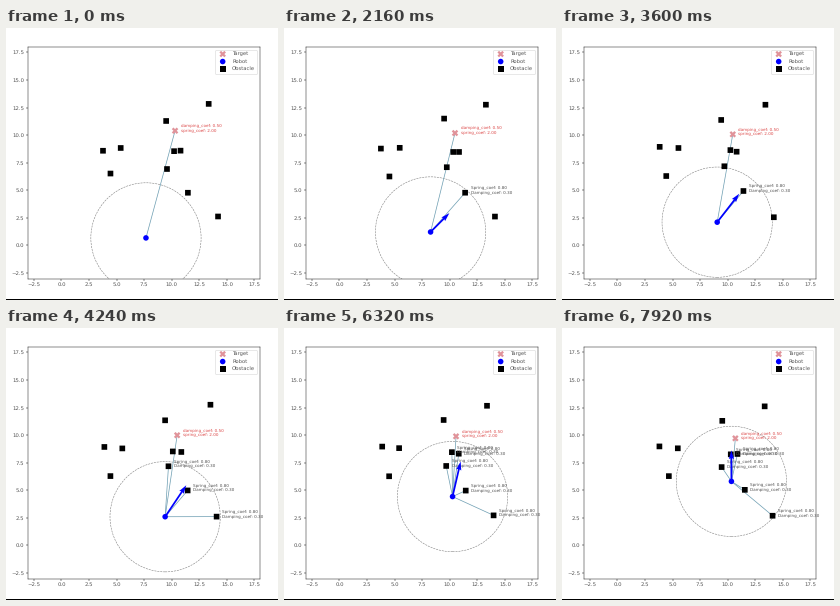
These frames come from a looping animation (272x272 px, 8000 ms). A matplotlib script:

```python
import numpy as np
import matplotlib.pyplot as plt
from matplotlib.animation import FuncAnimation
from matplotlib.patches import Circle, Rectangle

SIZE, DPI, FRAMES, INTERVAL = 272, 40, 100, 80
LEFT, TOP, SIDE = 22.4, 18.9, 231.6
SENSE_RADIUS = 5
ARROW_GAIN = 44
GRAY = "#555555"
steps = np.arange(FRAMES)
rng = np.random.default_rng(4)

plt.rcParams.update({"font.family": "DejaVu Sans", "text.hinting": "none"})


def drift():
    """Slow random wandering around the origin."""
    walk = np.cumsum(rng.uniform(-0.035, 0.035, (FRAMES, 2)), axis=0)
    return walk - walk.mean(axis=0)


# The robot eases sideways while its climb speeds up and then slackens.
across = np.minimum(steps / 88, 1)
robot = np.column_stack([7.66 + 2.67 * across**2 * (3 - 2 * across),
                         0.68 + 3.46 * (1 - np.cos(np.pi * steps / 150))])
velocity = ARROW_GAIN * np.gradient(robot, axis=0)
target = np.linspace((10.4, 10.45), (10.6, 9.65), FRAMES) + 0.5 * drift()
homes = [(3.83, 8.87), (5.44, 8.81), (4.5, 6.3), (9.45, 11.38), (13.35, 12.74),
         (10.23, 8.52), (10.83, 8.44), (9.65, 7.14), (11.45, 4.93), (14.1, 2.64)]
obstacles = np.array([home + drift() for home in homes])

fig = plt.figure(figsize=(SIZE / DPI, SIZE / DPI), dpi=DPI, facecolor="white")
ax = fig.add_axes([LEFT / SIZE, 1 - (TOP + SIDE) / SIZE, SIDE / SIZE, SIDE / SIZE])
ticks = np.arange(-2.5, 18, 2.5)
ax.set(xlim=(-3, 18), ylim=(-3, 18), xticks=ticks, yticks=ticks)
ax.tick_params(labelsize=9.7, labelcolor=GRAY)
fig.add_artist(Rectangle((0, 0), 1, 1 / SIZE, transform=fig.transFigure,
                         color="black", lw=0))


def marker(shape, color, size, label):
    return ax.scatter([], [], s=size**2, marker=shape, color=color, edgecolors="none",
                      label=label, snap=False, zorder=3)


def spring():
    return ax.plot([], [], color="#6f9fb3", lw=1.3, zorder=1.5)[0]


def note(text, color):
    return ax.text(0, 0, text, color=color, fontsize=7.4)


target_mark = marker("X", "#e0939a", 11.7, "Target")
robot_mark = marker("o", "blue", 10, "Robot")
obstacle_marks = marker("s", "black", 10.2, "Obstacle")
ax.legend(loc="upper right", fontsize=9.5, labelcolor=GRAY)

target_spring = spring()
target_note = note("damping_coef: 0.50\nspring_coef: 2.00", "#dd4c4c")
springs = [spring() for _ in homes]
notes = [note("Spring_coef: 0.80\nDamping_coef: 0.30", GRAY) for _ in homes]
sensor = ax.add_patch(Circle((0, 0), SENSE_RADIUS, fill=False, ec="#808080", lw=1, ls="--"))
arrow = ax.quiver([0], [0], [0], [0], color="blue", angles="xy", scale_units="xy",
                  scale=1, width=0.0075, zorder=4)


def link(line, label, start, end):
    line.set_data(*zip(start, end))
    label.set_position((end[0] + 0.5, end[1]))


def update(i):
    here = robot[i]
    target_mark.set_offsets([target[i]])
    robot_mark.set_offsets([here])
    obstacle_marks.set_offsets(obstacles[:, i])
    sensor.center = here
    arrow.set_offsets([here])
    arrow.set_UVC([velocity[i, 0]], [velocity[i, 1]])
    arrow.set_visible(i > 0)
    link(target_spring, target_note, here, target[i])
    for place, line, label in zip(obstacles[:, i], springs, notes):
        near = np.hypot(*(place - here)) < SENSE_RADIUS
        line.set_visible(near)
        label.set_visible(near)
        link(line, label, here, place)


anim = FuncAnimation(fig, update, frames=FRAMES, interval=INTERVAL,
                     repeat=True, repeat_delay=0)
plt.show()
```
